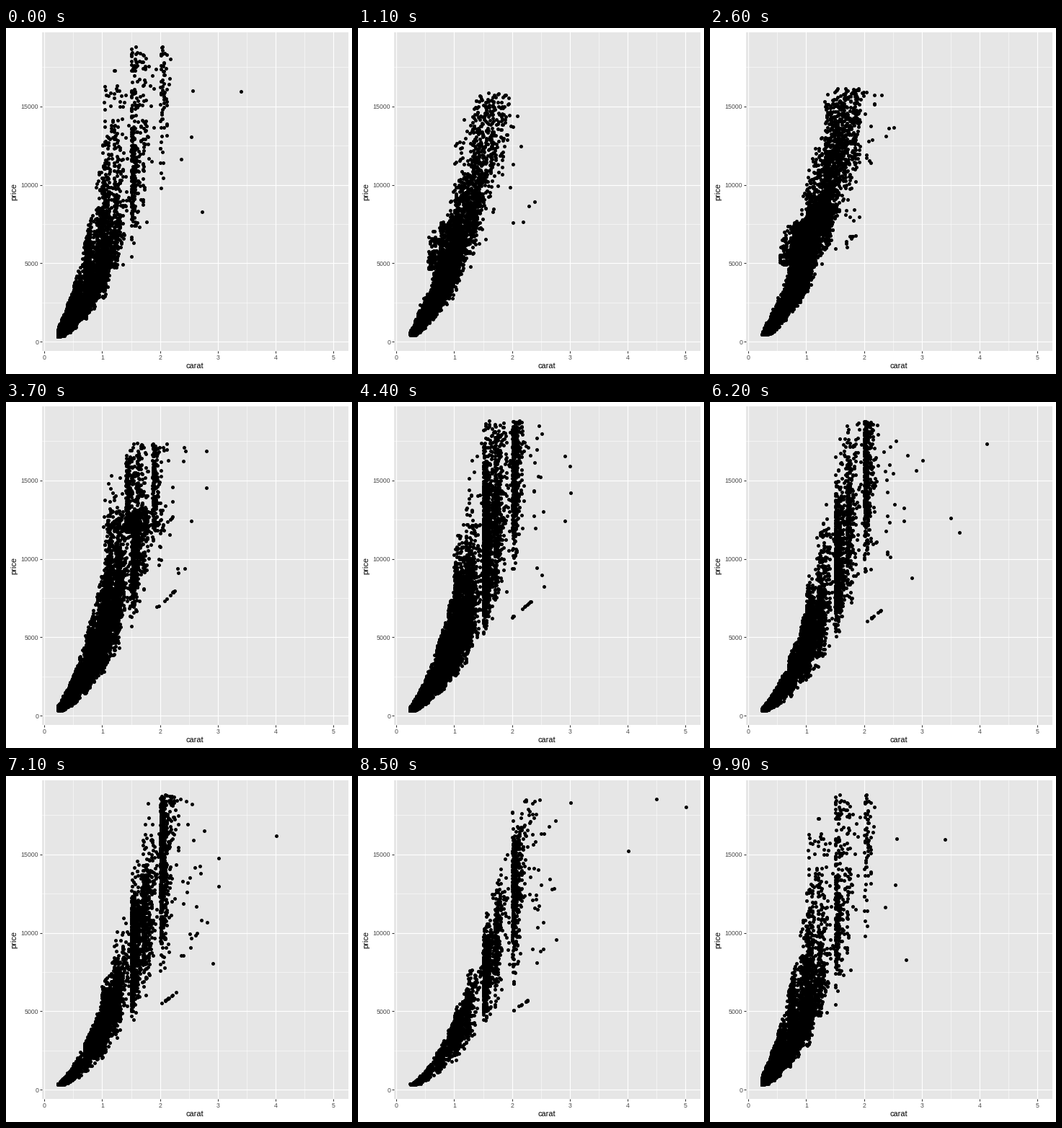
Recreate the animation shown at these times as a matplotlib script. Size 480 by 480 pixels, loop 10 s.

```python
import numpy as np
import matplotlib.pyplot as plt
from matplotlib.animation import FuncAnimation

plt.rcParams["font.family"] = "Liberation Sans"

SIZE, FRAMES, INTERVAL = 480, 100, 100
FLOOR, SPLIT, CEILING = 326, 2757, 18800

COUNTS = [6775, 9797, 9542, 11292, 8304, 5422, 2808]
HEAVY = [[(3.4, 15964)], [(3.05, 10453)], [(3.01, 18242)], [(3.01, 14220)],
         [(4.13, 17329), (3.65, 11668), (3.5, 12587)], [(4.01, 16193)],
         [(5.01, 18018), (4.5, 18531), (4.01, 15223)]]

# Stones cluster just above popular weights, most of all above the main ones
CARATS = np.array([0.23, 0.3, 0.4, 0.5, 0.7, 0.9, 1, 1.2, 1.5, 1.7, 2])
MAIN = np.isin(CARATS, [0.3, 0.7, 1, 1.5, 2])

# First changed frame and number of steps of each transition
MOVES = [(4, 11), (19, 11), (34, 11), (49, 9), (62, 10), (76, 10), (90, 10)]


def rare_stones(rng, grade):
    """Large stones, and for lower grades a straight line of cheap ones."""
    n = 4 + 4 * grade
    carat = np.minimum(2.35 + rng.exponential(0.2, n), 3.01)
    price = rng.uniform(8000, CEILING, n)
    rare = [HEAVY[grade], np.column_stack([carat, price])]
    if grade > 1:
        line = rng.uniform(2, 2.33, 10)
        rare.append(np.column_stack([line, (3760 - 208 * grade) * line]))
    return np.vstack(rare)


def stones(rng, grade):
    """Carat and price of one grade; lower grades are larger and cheaper."""
    n = 2 * COUNTS[grade]
    weight = np.exp(-1.6 * CARATS) * np.where(MAIN, 2.5, 1)
    weight *= CARATS ** (grade / 3)
    spread = np.where(rng.random(n) < 0.1, 0.18, 0.06)
    base = rng.choice(CARATS, n, p=weight / weight.sum())
    carat = np.round(base + rng.exponential(spread), 2)

    unit = 5300 - 1700 * (grade / 6) ** 2
    up, down = 0.42 - 0.05 * grade, 0.24
    z = rng.normal(size=n)
    keep = (z > -3) & (z < np.where(carat < 1, 2, 2.8))
    noise = np.where(z > 0, up, down) * z
    price = unit * carat ** (1.78 + 0.01 * grade) * np.exp(noise)
    price = np.maximum(price, FLOOR + 60 * rng.random(n))
    keep &= price < CEILING
    common = np.column_stack([carat, price])[keep]
    return np.vstack([rare_stones(rng, grade), common])[:COUNTS[grade]]


def in_order(pts):
    """Dear stones rising in price, then cheap ones rising in price."""
    price = pts[:, 1]
    return pts[np.lexsort((price, price <= SPLIT))]


def pair(old, new):
    """Match rows one to one; the new prices peak ahead of the old ones."""
    n = min(len(old), len(new))
    old, new = in_order(old[:n]), in_order(new[:n])
    lead = np.argmax(new[:, 1]) - int(0.87 * np.argmax(old[:, 1]))
    return old, np.roll(new, -lead, axis=0)


def ease(x):
    u = x ** 1.75
    return u * u * (3 - 2 * u)


rng = np.random.default_rng(12)
STATES = [stones(rng, grade) for grade in range(len(COUNTS))]
PAIRS = [pair(a, b) for a, b in zip(STATES, STATES[1:] + STATES[:1])]


def points_at(frame):
    pts = STATES[0]
    for i, (start, steps) in enumerate(MOVES):
        step = frame - start + 1
        if step >= steps:
            pts = STATES[(i + 1) % len(STATES)]
        elif step > 0:
            old, new = PAIRS[i]
            pts = old + (new - old) * ease(step / steps)
    return pts


fig = plt.figure(figsize=(SIZE / 72, SIZE / 72), dpi=72, facecolor="white")
left, right, top, bottom = 50, 474.5, 5.5, 448.3
ax = fig.add_axes([left / SIZE, 1 - bottom / SIZE,
                   (right - left) / SIZE, (bottom - top) / SIZE],
                  facecolor="#E6E6E6")
ax.set_xlim(-0.0405, 5.2505)
ax.set_ylim(-598.85, 19747.85)
ax.set_xticks(range(6))
ax.set_yticks(range(0, 15001, 5000))
ax.set_xticks(np.arange(0.5, 5), minor=True)
ax.set_yticks(range(2500, 17501, 5000), minor=True)
ax.set_axisbelow(True)
ax.grid(which="major", color="white", linewidth=1.1)
ax.grid(which="minor", color="white", linewidth=0.55)
ax.tick_params(which="major", length=2.75, width=1.07, pad=2.2,
               color="#333333", labelcolor="#4D4D4D", labelsize=8.8)
ax.tick_params(which="minor", length=0)
for spine in ax.spines.values():
    spine.set_visible(False)

label = dict(ha="center", va="center", fontsize=11, color="black")
fig.text(262 / SIZE, 1 - 469.5 / SIZE, "carat", **label)
fig.text(11 / SIZE, 1 - 227 / SIZE, "price", rotation=90, **label)

dots, = ax.plot([], [], "o", color="black", markersize=5, markeredgewidth=0)


def update(frame):
    dots.set_data(*points_at(frame).T)
    return dots,


anim = FuncAnimation(fig, update, frames=FRAMES, interval=INTERVAL,
                     repeat=True, repeat_delay=0)
plt.show()
```
